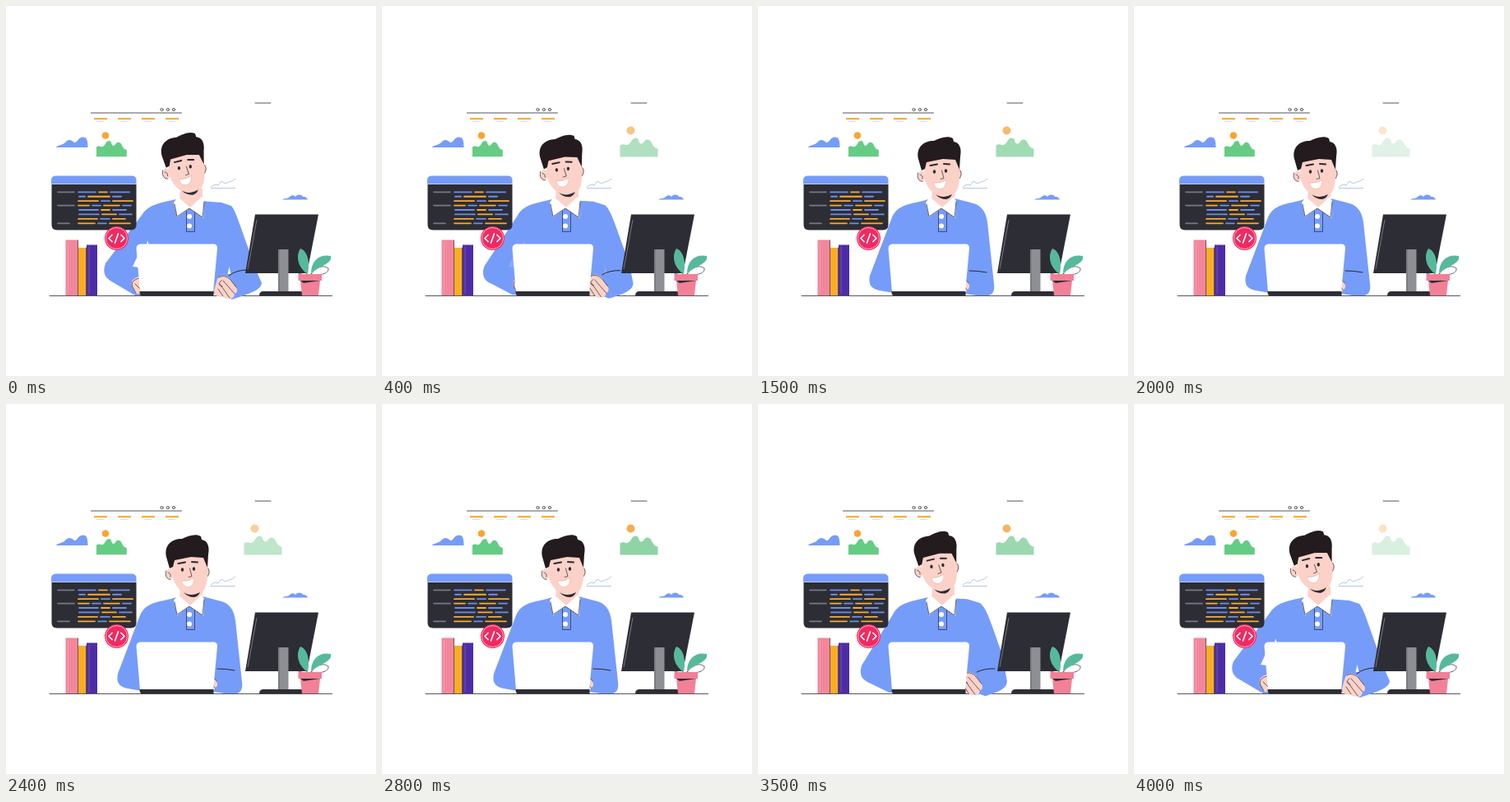
An HTML page that plays this animation: 450 px wide and 450 px high, repeating every 4100 ms.

```html
<!DOCTYPE html>
<html lang="en">
<head>
<meta charset="utf-8">
<style>
html, body { margin: 0; height: 100%; overflow: hidden; background: #fff; }
svg { display: block; width: 450px; height: 450px; }
.line { fill: none; stroke: #292932; stroke-width: 1; stroke-linecap: round; stroke-linejoin: round; }
.thin { stroke-width: .7; }
.soft { stroke: #55565c; }
.skin { fill: #fcd2c8; }
.dark { fill: #2d2d35; }
.blue { fill: #769cfa; }
</style>
</head>
<body>
<svg viewBox="0 0 450 450">
  <defs>
    <path id="hills" d="M0 23V9C5 6 7 10 10 8C14 6 14 0 19 0C24 0 22 7 26 7C30 6 29 2 33 2C40 2 38 12 46 13V23Z"/>
  </defs>

  <!-- floating charts and pictures -->
  <path class="line soft" d="M103.500 130H213.500M303 118H322"/>
  <g class="line soft"><circle cx="189.500" cy="126" r="1.600"/><circle cx="196.800" cy="126" r="1.600"/><circle cx="204" cy="126" r="1.600"/></g>
  <g id="tabs"></g>
  <path class="blue" d="M60.500 172C65 168 68 170 72 166C75 162 79 162 83 166C87 167 87 159.500 94 159.500C98 159.500 99.500 163 99.500 172Z"/>
  <path class="blue" d="M336 235.500C340 233 342 235 345 232C348 229.500 350 230 352 232C355 228.500 360 229 361 232C364 231.500 366 233 367 235.500Z"/>
  <circle cx="121" cy="157.500" r="4.300" fill="#fba42d"/>
  <use href="#hills" transform="translate(110 164) scale(.8 .84)" fill="#65cc84"/>
  <g id="picture">
    <circle cx="302.500" cy="151.500" r="5" fill="#f4ad50"/>
    <use href="#hills" x="289.500" y="160.500" fill="#8fd4a5"/>
  </g>
  <path d="M249 220L254 217L258 218L262 213L267 216L271 214L275 213L279 210M249 221.500H279" fill="none" stroke="#8fb0da" stroke-width=".7"/>

  <!-- desk and books -->
  <path class="line soft" d="M53 352.500H396.500"/>
  <path fill="#f2879b" d="M72.500 284.500H87.500V352H72.500Z"/>
  <path fill="#fbad24" d="M88 294H98V352H88Z"/>
  <path fill="#4d2da5" d="M98 290.500H111V352H98Z"/>
  <path class="line thin" d="M87.500 285V352M97.500 294V352"/>
  <path d="M75.500 287V350M101 293V350" stroke="#fff" stroke-width=".6" opacity=".3"/>

  <!-- person -->
  <path id="body" class="blue"/>
  <path id="gaps" fill="#fff" d="M154 317L160 304L162 318ZM271.500 317L269.500 326H273.500ZM172 285L171 291H174Z"/>
  <path id="sleeve" class="line"/>
  <path class="skin" d="M212 222H239V236L224 247L211 236Z"/>
  <path d="M209 232L204 239L208 257L223 246L240 258L241 237L238 232L224 245Z" fill="#fff"/>
  <path class="line thin" d="M205 241L208 256L223 246L239 257L241 238M219.500 250V274.500H229.500V251"/>
  <g fill="#fff"><circle cx="223" cy="256" r="3"/><circle cx="223" cy="267.500" r="3"/></g>
  <g id="head">
    <ellipse class="skin" cx="199" cy="207" rx="4.800" ry="6.500"/>
    <ellipse class="skin" cx="244" cy="204" rx="3.500" ry="6"/>
    <path class="line thin" d="M194.500 203C193 210 196 213 200 213.500M197 205Q201 206 200 210M246 200Q249 204 245 210"/>
    <path class="skin" d="M201 188L243 183L245 208C245 222 240 232 230 234C218 234 206 224 203 211Z"/>
    <path class="dark" d="M216 229C222 233 228 233 236 229Q234 234 229 235Q221 235 216 229Z"/>
    <path fill="#231b1d" d="M199 200L195 186C192 172 201 164 214 164C221 161 230 157 237 161L238 165C245 166 248 173 246 183L245 199L240 187L225 186L205 190L203 198Z"/>
    <path class="line" style="stroke-width:2" d="M209.500 194L218 192.500M226 192L233 192.500"/>
    <g class="dark"><ellipse cx="214.500" cy="201.500" rx="1.700" ry="2.200"/><ellipse cx="228.500" cy="200.500" rx="1.700" ry="2.200"/></g>
    <path class="line thin" d="M223.500 200L226 209.500L222 210.500"/>
    <path d="M213.500 215Q222 216 229 211.500C229 218 226 222.500 221.500 222.500C217 222.500 214.500 220 213.500 215Z" fill="#fff" stroke="#eea59b" stroke-width=".6"/>
  </g>
  <g id="leftHand">
    <path class="skin" d="M163 329C155 330 151 335 153 341L158 350H166V329Z"/>
    <path class="line thin" d="M162 331C154 333 152 337 154 342L158 349M157 338L163 344"/>
  </g>
  <g id="rightHand">
    <path class="skin" d="M257 332C261 326 268 327 272 331L280 342C282 346 281 350 278 350C278 354 275 357 272 355C268 357 265 355 264 353C258 355 253 352 253 346Z"/>
    <path class="line thin" d="M259 330C264 327 269 329 273 333L280 342M264 334L278 350M260 338L272 355M258 344L264 353M262 334C258 337 258 340 263 341"/>
  </g>

  <!-- laptop -->
  <path d="M164 289.500H252Q257.500 289.500 257 295L252 348H163L158.500 295Q158.500 289.500 164 289.500Z" fill="#fff"/>
  <path class="dark" d="M162.500 347H252.500V352.500H165Q162.500 352 162.500 347Z"/>

  <!-- monitor -->
  <path class="dark" d="M303 253.500H380L366 325H291Z"/>
  <path d="M305 260L294 320" stroke="#fff" stroke-width=".5" opacity=".7"/>
  <path fill="#8e8f94" d="M331 296H343.500V348H331Z"/>
  <path d="M332 296V347" stroke="#696a70"/>
  <path class="dark" d="M308 352.500Q308 347 313 347H361V352.500Z"/>

  <!-- plant -->
  <path class="line thin" d="M366 327C354 327 345 320 345 310C354 302 363 315 366 327M371 326C376 318 386 314 392 319C393 326 381 328 371 326"/>
  <path fill="#57b99b" d="M367 326C357 320 351 306 358 295C367 298 370 312 367 326ZM371 325C371 309 382 301 395 304C397 313 384 315 371 325Z"/>
  <path fill="#f28096" d="M355.500 326H384V334H382L380 352H360L358 334H355.500Z"/>
  <path class="dark" d="M358 334H382L362 337Z"/>

  <!-- code window -->
  <path class="dark" d="M55.500 217H158.500V266Q158.500 272.500 152 272.500H62Q55.500 272.500 55.500 266Z"/>
  <path class="blue" d="M55 216.500V212Q55 206.500 61 206.500H153Q158.500 206.500 158.500 212V216.500Z"/>
  <g id="code" stroke-width="1.800" stroke-linecap="round"></g>
  <circle cx="134.500" cy="282.500" r="14.500" fill="#f02a62"/>
  <circle cx="134.500" cy="282.500" r="13" fill="none" stroke="#fff" stroke-width=".6"/>
  <path d="M129 278.500L125 282.500L129 286.500M140 278.500L144 282.500L140 286.500M136.500 277L132.500 288" fill="none" stroke="#fff" stroke-width="1.700" stroke-linecap="round" stroke-linejoin="round"/>
</svg>
<script>
const LOOP = 4100;
const $ = id => document.getElementById(id);
const smooth = (a, b, t) => {
  const u = Math.min(1, Math.max(0, (t - a) / (b - a)));
  return u * u * (3 - 2 * u);
};

$('tabs').innerHTML = [107, 136, 165, 194].map(x =>
  `<path d="M${x} 136H${x + 16}V138.300H${x}Z" fill="#f5b13f"/><path d="M${x + 3} 140.500H${x + 12}" stroke="#dcdce0"/>`).join('');

// Each row: start of the first segment, then segment ends.
const rows = [[88, 109, 123, 150], [89, 96, 126, 140], [88, 112, 126, 154], [88, 101, 115, 138, 152],
  [89, 112, 126, 146], [89, 113, 134, 153], [88, 111, 126, 145], [88, 108, 122, 151]];
const labelEnds = { 0: 83, 3: 83, 7: 77 };
const bar = (x1, x2, y, color) => `<path d="M${x1} ${y}H${x2}" stroke="${color}"/>`;
$('code').innerHTML = rows.map((row, r) => {
  const y = 226.300 + r * 5.430;
  const label = labelEnds[r] ? bar(63, labelEnds[r], y, '#777983') : '';
  return label + row.slice(1).map((end, i) =>
    bar(row[i] + (i ? 4 : 0), end, y, (i + (r % 4 > 1)) % 2 ? '#f6ad35' : '#6d8fea')).join('');
}).join('');

// Blends two paths that share the same commands.
function blend(from, to, k) {
  const target = to.match(/[\d.]+/g);
  let i = 0;
  return from.replace(/[\d.]+/g, n => (+n + (target[i++] - n) * k).toFixed(2));
}

const bodyIn = 'M207 235C190 241 171 239 163 257L136 328C134 338 137 344 148 346L165 349L252 350L266 352L280 352C286 351 288 346 287 338L279 263C277 250 272 243 262 240L239 234Z';
const bodyOut = 'M207 235C190 239 174 241 166 253L121 313C117 324 120 331 130 336L157 352L163 352L262 350L275 357L303 348C310 344 311 337 307 328L283 263C280 250 274 243 262 239L239 234Z';
const sleeveIn = 'M257 322Q268 322 278 324';
const sleeveOut = 'M271 328Q280 321 293 321';

function draw(t) {
  const spread = 1 - smooth(0, 1300, t) + smooth(2800, 3950, t);
  const tilt = 1 - smooth(0, 800, t) + smooth(2850, 3700, t);
  $('body').setAttribute('d', blend(bodyIn, bodyOut, spread));
  $('sleeve').setAttribute('d', blend(sleeveIn, sleeveOut, spread));
  $('gaps').setAttribute('opacity', smooth(.7, 1, spread));
  $('leftHand').setAttribute('transform', `translate(${30 * (1 - spread)} 0)`);
  $('rightHand').setAttribute('transform', `translate(${-24 * (1 - spread)} ${-5 * (1 - spread)})`);
  $('head').setAttribute('transform', `translate(${-2 * tilt} ${-5 * tilt}) rotate(${-4 * tilt} 224 232)`);

  const p = t % (LOOP / 2);
  const fade = p < 1350 ? smooth(50, 600, p) : 1 - (p - 1350) / 900;
  $('picture').setAttribute('opacity', fade);
}

function tick() {
  draw(performance.now() % LOOP);
  requestAnimationFrame(tick);
}
tick();
</script>
</body>
</html>
```
